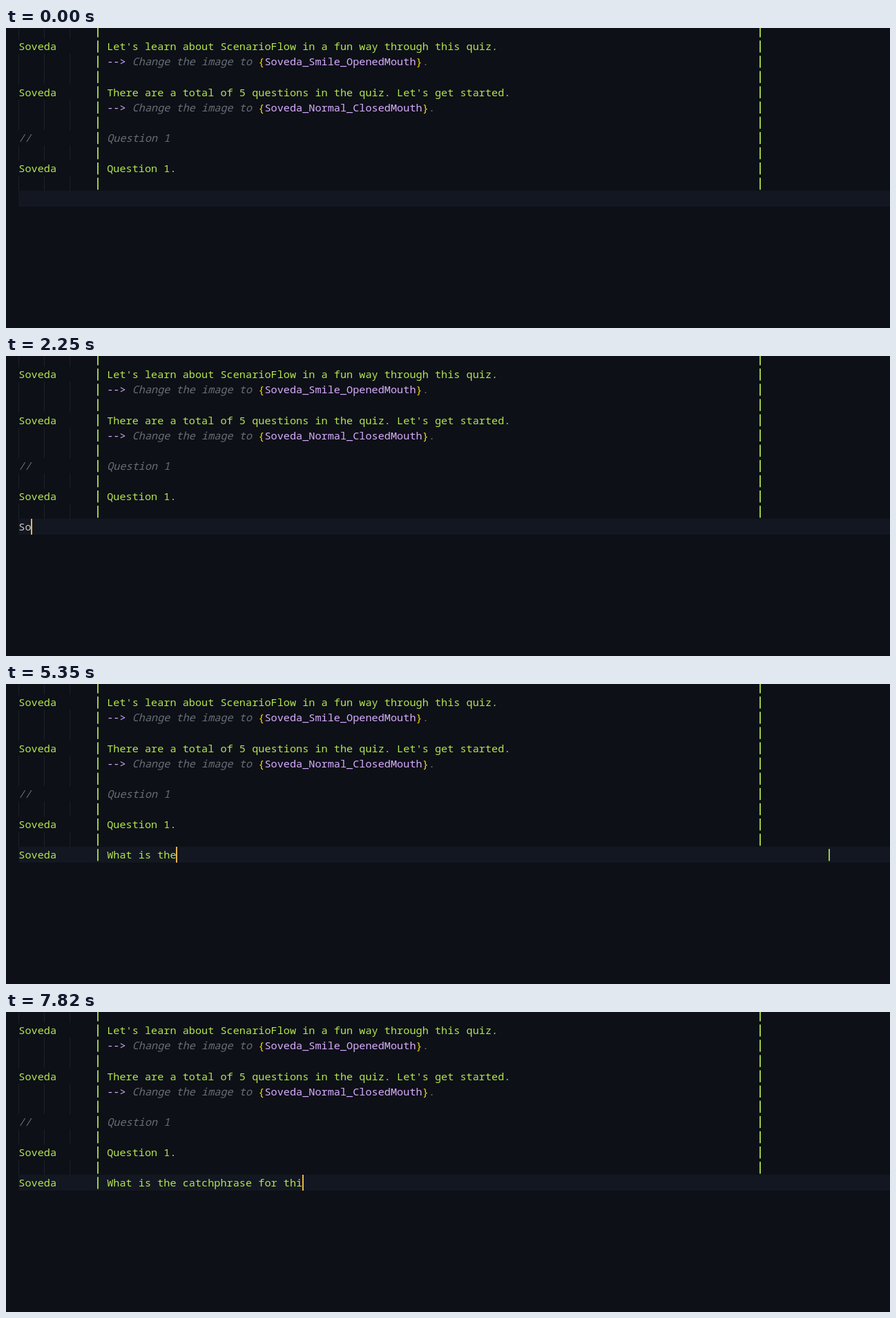
These frames come from a looping animation (1280 by 435 pixels, 8000 ms). An HTML page with a canvas:

```html
<!DOCTYPE html>
<html lang="en">
<head>
<meta charset="utf-8">
<title>Scenario editor</title>
<style>
  html, body { margin: 0; width: 100%; height: 100%; overflow: hidden; background: #0d1017; }
  canvas { display: block; width: 100%; height: 100%; }
</style>
</head>
<body>
<canvas id="stage" width="1280" height="435"></canvas>
<script>
const ctx = document.getElementById('stage').getContext('2d');

const LOOP = 8000;
const LEFT = 18.32, TOP = 15.5, ROW = 22.1, CELL = 9.13;
const SIZE = CELL / 0.6, SMALL = 7.76 / 0.6;
const PIPE = 12, BODY = 14, END = 117, LIVE = 10;
const NAME = 'Soveda';
const QUESTION = 'What is the catchphrase for thi';

const C = {
  bg: '#0d1017', line: '#131721', guide: '#1c2028', plain: '#cbc9c2',
  green: '#b4e650', pipe: '#9ccc46', purple: '#d9acff', gold: '#ffd700',
  comment: '#686e75', caret: '#e6b450', dim: '#8f8f8c', popup: '#0f131a',
  selected: '#1d212a', scroll: '#2b2f37', icon: '#444850'
};

// Key press times
const nameKeys = [2040, 2250, 2320, 2380, 2450, 2580];
const textKeys = [
  3880, 3950, 4080, 4140, 4280, 4480, 4680, 4880, 5210, 5280, 5350, 5480,
  5750, 5890, 6020, 6290, 6420, 6570, 6700, 6760, 6900,
  7100, 7170, 7300, 7370, 7440, 7500, 7570, 7700, 7700, 7820
];
const LIST_AT = 2110, DETAIL_AT = 2180, CLOSE_AT = 2250, SPLIT_AT = 2910, COLOR_AT = 2980;

const say = text => [[text, C.green]];
const note = text => [[text, C.comment, 'italic 500']];
const change = pose => [
  ['--> ', C.purple], ...note('Change the image to '), ['{', C.gold],
  [NAME + '_' + pose, C.purple], ['}', C.gold], ...note('.')
];

const script = [
  { row: 0, head: say(NAME), body: say("Let's learn about ScenarioFlow in a fun way through this quiz.") },
  { row: 1, body: change('Smile_OpenedMouth') },
  { row: 3, head: say(NAME), body: say("There are a total of 5 questions in the quiz. Let's get started.") },
  { row: 4, body: change('Normal_ClosedMouth') },
  { row: 6, head: note('//'), body: note('Question 1') },
  { row: 8, head: say(NAME), body: say('Question 1.') }
];

const OLD = '[Not Recommended] ';
const options = [
  ['$s-forced', OLD + 'Serial-Forced'],
  ['$s-promised', OLD + 'Serial-Promised'],
  ['$s-standard', OLD + 'Serial-Standard'],
  ['$serial', 'Serial'],
  ['$standard', 'Standard'],
  ['$sync', 'Synchronous'],
  ['$f-standard', 'Fluent-Standard'],
  ['$p-standard', OLD + 'Parallel-Standard']
];

const colX = col => LEFT + col * CELL;
const rowY = row => TOP + row * ROW;
const pressed = (keys, t) => keys.filter(k => k <= t).length;

function rect(x, y, w, h, color) {
  ctx.fillStyle = color;
  ctx.fillRect(x, y, w, h);
}

// Monospace text laid out on a cell grid
function write(text, x, y, color, style = '500', size = SIZE) {
  ctx.font = `${style} ${size}px "Noto Sans Mono", "DejaVu Sans Mono", monospace`;
  ctx.fillStyle = color;
  [...text].forEach((ch, i) => {
    if (ch !== ' ') ctx.fillText(ch, x + i * size * 0.6, y);
  });
}

function writeRuns(runs, col, row) {
  for (const [text, color, style] of runs) {
    write(text, colX(col), rowY(row) + 16.7, color, style);
    col += text.length;
  }
}

function pipe(col, row, color = C.pipe) {
  rect(Math.floor(colX(col + 0.5)), rowY(row) + 2.7, 2, 17.4, color);
}

function drawScript() {
  for (let row = -1; row < LIVE; row++) {
    const entry = script.find(s => s.row === row);
    if (!entry || !entry.head) {
      for (const col of [0, 4, 8]) rect(Math.round(colX(col) + 0.15), rowY(row), 1, ROW, C.guide);
    }
    pipe(PIPE, row);
    pipe(END, row);
    if (entry) {
      if (entry.head) writeRuns(entry.head, 0, row);
      writeRuns(entry.body, BODY, row);
    }
  }
}

function caretOn(t) {
  if (t < 2040) return (t >= 720 && t < 1180) || t >= 1640;
  return t < 3410 || t >= 3880;
}

function drawLiveRow(t) {
  rect(18, 236, 1262, 23, C.line);
  const colored = t >= COLOR_AT;
  const color = colored ? C.green : C.plain;
  const typed = pressed(textKeys, t);
  let col = pressed(nameKeys, t);
  writeRuns([[NAME.slice(0, col), color]], 0, LIVE);
  if (t >= SPLIT_AT) {
    col = BODY + typed;
    pipe(PIPE, LIVE, colored ? C.pipe : C.plain);
    pipe(END + typed, LIVE, colored ? C.pipe : C.plain);
    writeRuns([[QUESTION.slice(0, typed), color]], BODY, LIVE);
  }
  if (caretOn(t)) rect(Math.floor(colX(col)), 236, 2, 23, C.caret);
}

function drawList() {
  rect(28, 259, 713, 176, C.popup);
  rect(28, 259.5, 703, 22, C.selected);
  rect(731, 259, 10, 176, C.scroll);
  rect(27.5, 259, 1, 176, C.line);
  options.forEach(([label, kind], i) => {
    const y = 275.7 + i * ROW;
    ctx.strokeStyle = i ? C.icon : C.plain;
    ctx.lineWidth = 1;
    ctx.strokeRect(32.5, Math.round(y - 11) - 0.5, 11, 12);
    const hit = label.indexOf('s');
    const x = 48.3;
    write(label.slice(0, hit), x, y, C.plain);
    write('s', x + hit * CELL, y, C.caret, 'bold');
    write(label.slice(hit + 1), x + (hit + 1) * CELL, y, C.plain);
    const info = kind + ' Command Scope';
    write(info, 731.3 - info.length * SMALL * 0.6, y - 0.9, C.dim, '500', SMALL);
  });
}

function drawDetail() {
  rect(741, 259, 305, 111, C.popup);
  ctx.strokeStyle = '#171b24';
  ctx.lineWidth = 1;
  ctx.strokeRect(741.5, 259.5, 304, 111);
  ['[Not Recommended] Serial-Force', 'd Command Scope (SFText Utilit', 'y)']
    .forEach((text, i) => write(text, 745.5, 279.2 + i * ROW, C.dim));
  write('$s-forced', 745.5, 361, C.plain);
  ctx.strokeStyle = C.plain;
  ctx.beginPath();
  ctx.moveTo(1029, 267.5);
  ctx.lineTo(1036, 274.5);
  ctx.moveTo(1036, 267.5);
  ctx.lineTo(1029, 274.5);
  ctx.stroke();
}

function draw(t) {
  rect(0, 0, 1280, 435, C.bg);
  drawScript();
  drawLiveRow(t);
  if (t >= LIST_AT && t < CLOSE_AT) {
    drawList();
    if (t >= DETAIL_AT) drawDetail();
  }
}

const start = performance.now();
function tick() {
  draw((performance.now() - start) % LOOP);
  requestAnimationFrame(tick);
}
tick();
</script>
</body>
</html>
```
